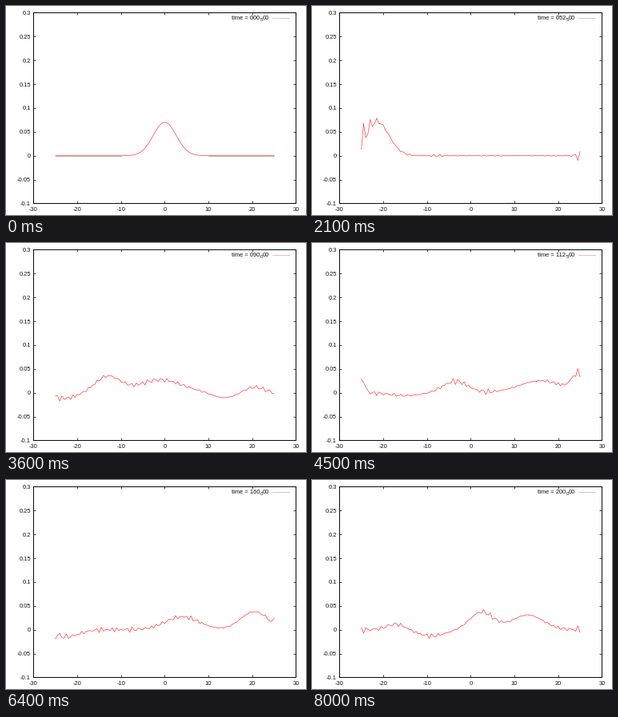
Recreate the animation shown at these times as a matplotlib script. Size 375x262 px, loop 8100 ms.

```python
import numpy as np
import matplotlib.pyplot as plt
from matplotlib.animation import FuncAnimation

W, H, DPI = 375, 262, 100
PT = 72 / DPI
FRAMES, INTERVAL, TIME_STEP = 81, 100, 2.5
RED, PALE, GREY = "#ff3c3c", "#dcc0c0", "#b4bcbc"
FONT = dict(family="Liberation Sans", color="#111111")

plt.rcParams["axes.unicode_minus"] = False
fig = plt.figure(figsize=(W / DPI, H / DPI), dpi=DPI, facecolor="white")
ax = fig.add_axes([34.4 / W, 1 - 247.4 / H, 328 / W, 239 / H])
ax.set(xlim=(-30, 30), ylim=(-0.1, 0.3))
ax.set_xticks(range(-30, 31, 10))
ax.set_yticks(np.arange(-2, 7) * 0.05)
ax.set_yticklabels([f"{round(v, 2) + 0:g}" for v in ax.get_yticks()])
ax.tick_params(direction="in", top=True, right=True, length=3 * PT,
               width=0.7 * PT, pad=3.5 * PT, labelsize=7.5 * PT)
ax.tick_params(axis="x", pad=4.3 * PT)
for label in ax.get_xticklabels() + ax.get_yticklabels():
    label.set(**FONT)
for spine in ax.spines.values():
    spine.set_linewidth(0.95 * PT)

x = np.linspace(-25, 25, 101)

# time, drift before, drift after, humps as (centre, height / 1000, width)
KEYS = [
    (0, 0, -21.5, [(0, 70.5, 3.7)]),
    (52.5, -21.5, -16, [(-21.5, 72, 3.9)]),
    (90, 15, 10, [(-13, 34, 4), (-1, 27, 7), (13.5, -11, 3.5),
                  (20.5, 12, 3), (-23, -12, 4)]),
    (112.5, 10, 13, [(-3.5, 24, 4), (16, 25, 7), (24.5, 35, 2),
                     (-15, -6, 5), (-25, 30, 1)]),
    (140, 13, 9, [(11.5, 46, 4.2), (-8, 16, 5.5), (1, -10, 3)]),
    (160, 9, 10, [(4, 27, 5.5), (20.5, 38, 4.4), (-22.5, -15, 4)]),
    (200, -10, 0, [(2.5, 37, 3.8), (13, 31, 5), (-9, -13, 4.5),
                   (-17, 12, 3)]),
]

rng = np.random.default_rng(4)
ripples = list(zip(rng.uniform(3.6, 5.6, 7), rng.uniform(-1, 1, 7),
                   rng.uniform(0, 2 * np.pi, 7)))


def bell(pos, centre, width):
    return np.exp(-((pos - centre) / width) ** 2)


def shape(humps, shift):
    return sum(h / 1000 * bell(x, c + shift, w) for c, h, w in humps)


def ripple(t):
    noise = sum(np.cos(k * x - w * t + p) for k, w, p in ripples)
    quiet = 1 - 0.85 * bell(x, 12.5, 5)
    strength = 0.0005 * min(t / 50, 1) + 0.0009 * np.clip((t - 52) / 20, 0, 1)
    return strength * noise * quiet


def wall_spikes(t):
    """Short waves thrown up while the pulse hits a wall."""
    rest = 0.01 * np.clip((t - 55) / 20, 0, 1)
    left, right = x + 25, 25 - x

    def spikes(dist, amount, reach):
        phase = 2 * np.pi * (dist - 0.5) / 1.5 - 1.3 * (t - 52.5)
        return amount * np.exp(-dist / reach) * np.cos(phase)

    return (spikes(left, rest + 0.075 * bell(t, 61, 10), 2)
            - spikes(right, rest + 0.03 * bell(t, 58, 8)
                     + 0.065 * bell(t, 172, 8), 0.9))


def wave(t):
    n = max(i for i in range(len(KEYS) - 1) if KEYS[i][0] <= t)
    start, _, drift_out, humps_a = KEYS[n]
    end, drift_in, _, humps_b = KEYS[n + 1]
    s = (t - start) / (end - start)
    mix = s * s * (3 - 2 * s)
    body = ((1 - mix) * shape(humps_a, drift_out * s)
            + mix * shape(humps_b, -drift_in * (1 - s)))
    return body + ripple(t) + wall_spikes(t)


def caption(px, py, size, text=""):
    return fig.text(px / W, 1 - py / H, text, ha="right", va="baseline",
                    fontsize=size * PT, **FONT)


curve, = ax.plot([], [], color=RED, lw=0.7 * PT)
tails, = ax.plot(x, np.where(np.abs(x) >= 10, 0, np.nan),
                 color=GREY, lw=0.95 * PT)
fig.add_artist(plt.Line2D([333 / W, 354 / W], [1 - 15.4 / H] * 2, color=PALE,
                          lw=0.95 * PT, transform=fig.transFigure))
whole = caption(317.3, 16.9, 7.5)
tenth = caption(320.7, 18.9, 6)
caption(329, 16.9, 7.5, "00")


def draw(step):
    t = step * TIME_STEP
    curve.set_data(x, wave(t))
    tails.set_visible(step == 0)
    shown = max(t, 0.5)
    whole.set_text(f"time = {int(shown):03d}")
    tenth.set_text(str(int(shown * 10) % 10))
    return curve, tails, whole, tenth


anim = FuncAnimation(fig, draw, frames=FRAMES, interval=INTERVAL,
                     repeat=True, repeat_delay=0, blit=False)
plt.show()
```
